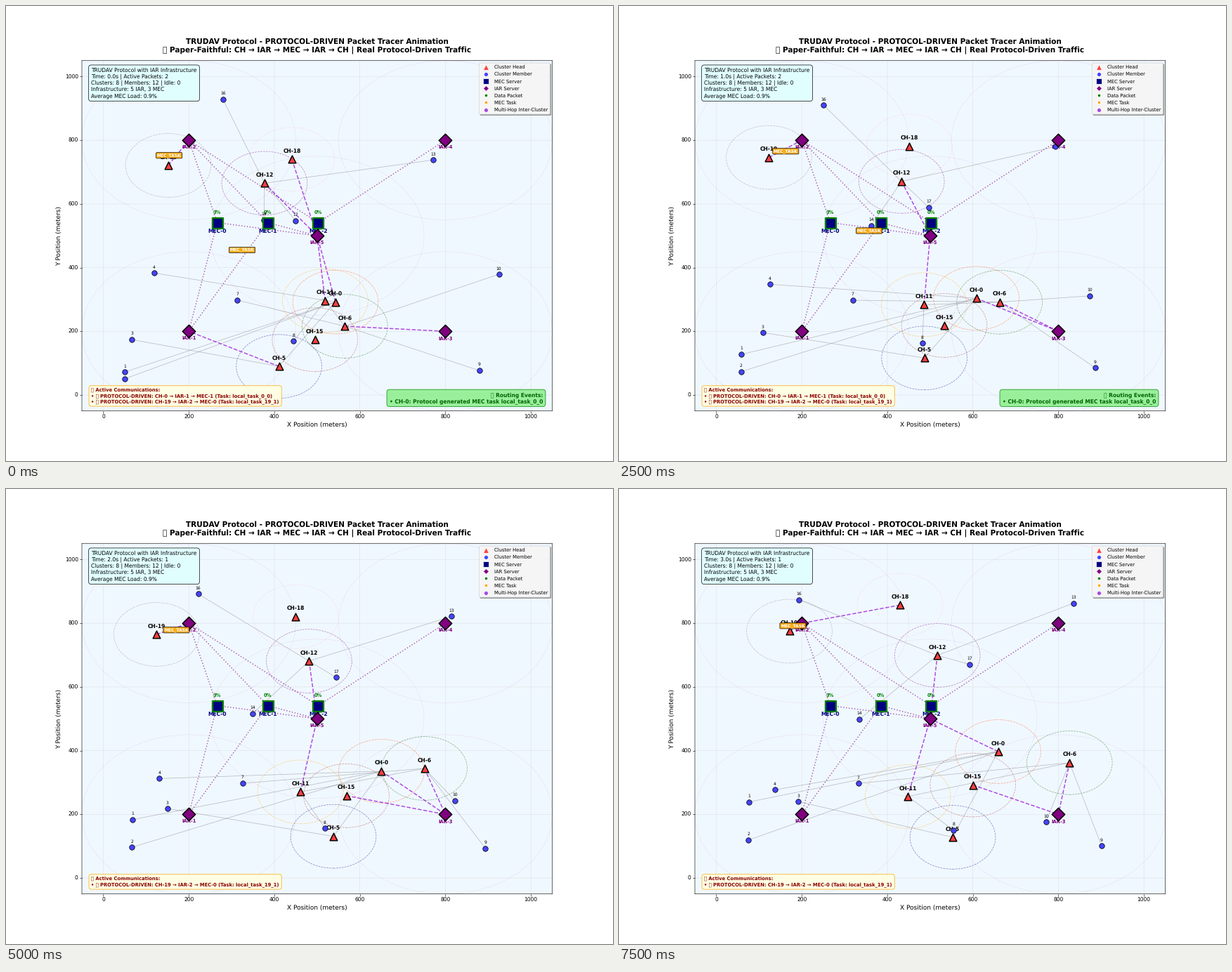
Animation of 864x648 px, one loop 8 s. Source, as a matplotlib script:

```python
import matplotlib.pyplot as plt
import numpy as np
from matplotlib.animation import FuncAnimation
from matplotlib.collections import LineCollection
from matplotlib.lines import Line2D
from matplotlib.patches import Circle

FRAMES, STEP_MS = 16, 500
TURN = 8                 # step at which the heads change course
TASK_DONE = 10           # first step without the CH-0 task
RADIO, COVERAGE, BACKHAUL = 100, 250, 400
ICON = "\U0001F4E1"
RED, BLUE, VIOLET = "#ff4040", "#4444ff", "darkviolet"

# Unsnapped paths and unhinted glyphs keep true proportions at this low dpi
plt.rcParams.update({"font.family": "DejaVu Sans", "text.hinting": "none", "path.snap": False})

# Cluster heads: start, turning point, end (meters)
HEADS = {
    0: [(543, 292), (647, 311), (659, 397)],
    5: [(411, 90), (532, 132), (553, 128)],
    6: [(565, 216), (721, 337), (826, 362)],
    11: [(519, 296), (466, 276), (448, 256)],
    12: [(377, 665), (467, 674), (517, 699)],
    15: [(495, 174), (556, 245), (600, 292)],
    18: [(441, 740), (458, 806), (430, 857)],
    19: [(152, 721), (106, 761), (171, 775)],
}
# Members drift steadily: start, end
MEMBERS = {
    1: [(50, 72), (77, 239)], 2: [(50, 51), (75, 119)], 3: [(67, 174), (192, 240)],
    4: [(119, 383), (137, 277)], 7: [(313, 298), (332, 297)], 8: [(445, 169), (555, 150)],
    9: [(879, 77), (901, 101)], 10: [(925, 379), (771, 176)], 13: [(771, 738), (835, 863)],
    14: [(376, 549), (335, 499)], 16: [(280, 928), (193, 874)], 17: [(450, 547), (592, 671)],
}
NODES = {**HEADS, **MEMBERS}
CLUSTERS = {0: (1, 2, 4, 5), 5: (3,), 6: (7, 9, 10, 11), 11: (8,), 12: (13, 14, 16, 17)}
RING_COLORS = ["orangered", "darkblue", "darkgreen", "orange", "purple", "brown", "pink", "gray"]

IAR = np.array([(x, y) for x in (200, 800) for y in (200, 800)] + [(500, 500)], float)
MEC = np.array([(x, 541.3) for x in np.linspace(266.5, 502.7, 3)])

fig, ax = plt.subplots(figsize=(16, 12), dpi=54)
fig.subplots_adjust(left=0.125, right=0.9, bottom=0.11, top=0.88)
ax.set(xlim=(-50, 1050), ylim=(-50, 1050), facecolor="aliceblue")
ax.set_xlabel("X Position (meters)", fontsize=12)
ax.set_ylabel("Y Position (meters)", fontsize=12)
ax.set_title("TRUDAV Protocol - PROTOCOL-DRIVEN Packet Tracer Animation\n"
             f"{ICON} Paper-Faithful: CH → IAR → MEC → IAR → CH | Real Protocol-Driven Traffic",
             fontsize=14, fontweight="bold", pad=15)
ax.grid(True, alpha=0.3)


def position(node, step):
    last = FRAMES - 1
    keys = (0, TURN, last) if node in HEADS else (0, last)
    return np.array([np.interp(step, keys, axis) for axis in zip(*NODES[node])])


def label(text, size=10, color="black", va="bottom", weight="bold", xy=(0, 0)):
    return ax.text(*xy, text, fontsize=size, color=color, ha="center", va=va, fontweight=weight)


def ring(radius, color, style, alpha, xy=(0, 0)):
    return ax.add_patch(Circle(xy, radius, fill=False, edgecolor=color,
                               linestyle=style, linewidth=1, alpha=alpha))


def panel(x, y, size, face, edge, color="black", weight="normal", ha="left", va="bottom"):
    return ax.text(x, y, "", transform=ax.transAxes, fontsize=size, color=color,
                   fontweight=weight, ha=ha, va=va, zorder=10,
                   bbox=dict(boxstyle="round,pad=0.5", facecolor=face, edgecolor=edge, alpha=0.9))


def lines(color, width, style, alpha):
    return ax.add_collection(LineCollection([], colors=color, linewidths=width,
                                            linestyles=style, alpha=alpha), autolim=False)


def dots(points, size, color, marker, edge, width, zorder):
    return ax.scatter(*np.transpose(points), s=size, c=color, marker=marker,
                      edgecolors=edge, linewidths=width, zorder=zorder)


# Fixed infrastructure
for i, xy in enumerate(IAR, 1):
    ring(COVERAGE, "purple", ":", 0.2, xy)
    label(f"IAR-{i}", 9, "purple", "top", xy=xy - (0, 15))
for i, (xy, load) in enumerate(zip(MEC, (3, 0, 0))):
    label(f"MEC-{i}", 10, "navy", "top", xy=xy - (0, 20))
    label(f"{load}%", 9, "green", xy=xy + (0, 25))
lines("purple", 2, ":", 0.6).set_segments(
    [(a, b) for a in IAR for b in MEC if np.hypot(*(a - b)) < BACKHAUL])
dots(MEC, 400, "navy", "s", "green", 3, 6)
dots(IAR, 300, "purple", "D", "black", 2, 7)

# Moving parts
member_links = lines("gray", 1, "-", 0.5)
uplinks = lines(VIOLET, 2, "--", 0.7)
rings = {n: ring(RADIO, c, "--", 0.45) for n, c in zip(HEADS, RING_COLORS)}
tags = {n: label(f"CH-{n}") if n in HEADS else label(str(n), 8, weight="normal") for n in NODES}
member_dots = dots([position(n, 0) for n in MEMBERS], 100, BLUE, "o", "black", 1, 4)
head_dots = dots([position(n, 0) for n in HEADS], 200, RED, "^", "black", 2, 5)


def packet():
    return ax.text(0, 0, "MEC_TASK", fontsize=8, color="white", fontweight="bold",
                   ha="center", va="center", zorder=12,
                   bbox=dict(boxstyle="round,pad=0.2", facecolor="orange",
                             edgecolor="black", alpha=0.9))


# (text, from, to, initial progress, progress per step)
packets = [(packet(), np.array((150, 721)), IAR[1], 0.08, 0.0335),
           (packet(), IAR[0], MEC[1], 0.675, 0.0355)]

info = panel(0.02, 0.98, 10, "lightcyan", "black", va="top")
comms = panel(0.02, 0.02, 9, "lightyellow", "orange", "darkred", "bold")
events = panel(0.98, 0.02, 10, "lightgreen", "green", "darkgreen", "bold", ha="right")
events.set_text(f"{ICON} Routing Events:\n• CH-0: Protocol generated MEC task local_task_0_0")

LEGEND = [("Cluster Head", "^", RED, 10), ("Cluster Member", "o", BLUE, 8),
          ("MEC Server", "s", "navy", 10), ("IAR Server", "D", "purple", 8),
          ("Data Packet", "o", "green", 6), ("MEC Task", "o", "orange", 6),
          ("Multi-Hop Inter-Cluster", "o", "#a94ade", 8)]
ax.legend(handles=[Line2D([0], [0], marker=m, color="w", markerfacecolor=c, markersize=s,
                          label=t, linestyle="none") for t, m, c, s in LEGEND],
          loc="upper right", fontsize=9, shadow=True, framealpha=0.9)


def update(step):
    pos = {n: position(n, step) for n in NODES}
    for n, xy in pos.items():
        tags[n].set_position(xy + (0, 15 if n in HEADS else 12))
    for n, circle in rings.items():
        circle.center = tuple(pos[n])
    head_dots.set_offsets([pos[n] for n in HEADS])
    member_dots.set_offsets([pos[n] for n in MEMBERS])
    member_links.set_segments([(pos[m], pos[h]) for h, group in CLUSTERS.items() for m in group])

    # Each head joins the nearest server in range
    joined = []
    for n in HEADS:
        dist = np.hypot(*(IAR - pos[n]).T)
        if dist.min() <= COVERAGE:
            joined.append((pos[n], IAR[dist.argmin()]))
    uplinks.set_segments(joined)

    for text, start, end, first, rate in packets:
        text.set_position(start + (end - start) * (first + rate * step) + (0, 25))
    busy = step < TASK_DONE
    packets[1][0].set_visible(busy)
    events.set_visible(busy)

    info.set_text("TRUDAV Protocol with IAR Infrastructure\n"
                  f"Time: {step * 0.2:.1f}s | Active Packets: {1 + busy}\n"
                  "Clusters: 8 | Members: 12 | Idle: 0\n"
                  "Infrastructure: 5 IAR, 3 MEC\n"
                  "Average MEC Load: 0.9%")
    routes = ["CH-0 → IAR-1 → MEC-1 (Task: local_task_0_0)"] if busy else []
    routes.append("CH-19 → IAR-2 → MEC-0 (Task: local_task_19_1)")
    comms.set_text("\n".join([f"{ICON} Active Communications:"]
                             + [f"• {ICON} PROTOCOL-DRIVEN: {r}" for r in routes]))
    return []


anim = FuncAnimation(fig, update, frames=FRAMES, init_func=lambda: update(0),
                     interval=STEP_MS, repeat=True)
plt.show()
```
